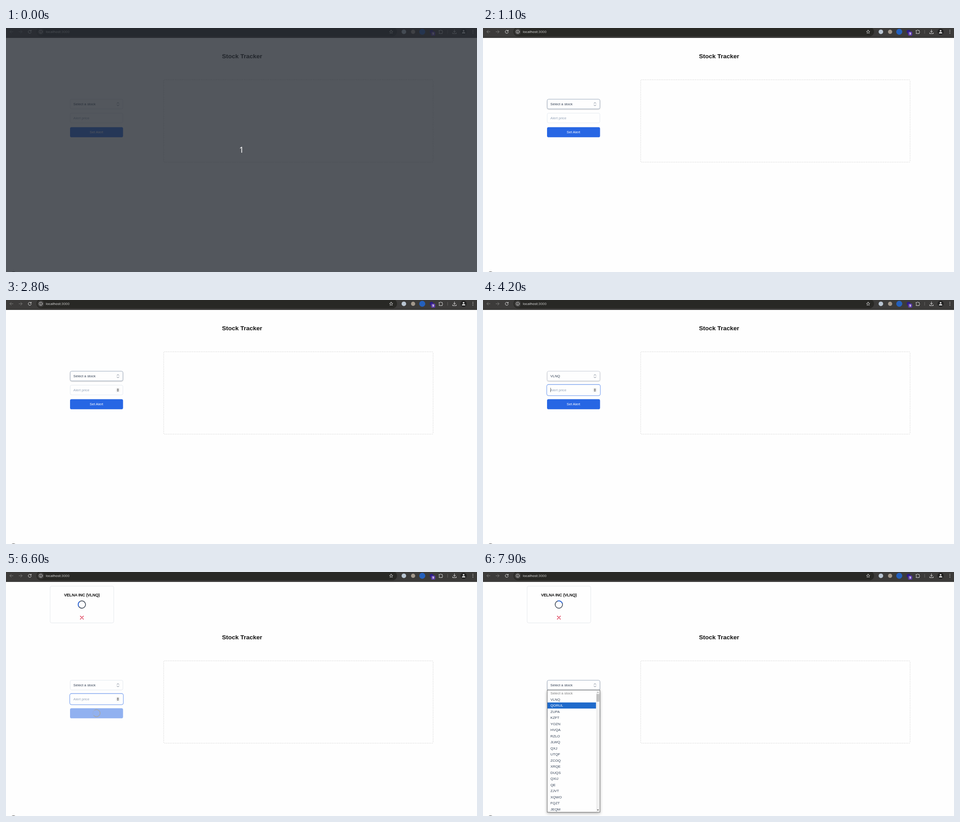
An HTML page that plays this animation: 1037 by 540 pixels, repeating every 8000 ms.

```html
<!DOCTYPE html>
<html lang="en">
<head>
<title>Stock Tracker</title>
<style>
  html, body { margin: 0; width: 100%; height: 100%; overflow: hidden; background: #fefefe; }
  svg { display: block; width: 1037px; height: 540px; }
  text { font: 7.875px "Liberation Sans", Arial, sans-serif; fill: #334155; white-space: pre; }
  .ui { font-family: "Noto Sans", "Open Sans", sans-serif; }
  .mid { text-anchor: middle; }
  .line { fill: none; stroke-linecap: round; stroke-linejoin: round; }
  .soft { filter: drop-shadow(0 .6px .5px #0001); }
  .lift { filter: drop-shadow(0 1px 1.2px #0003); }
  .float { filter: drop-shadow(0 2px 3px #0005); }
</style>
</head>
<body>
<svg viewBox="0 0 1037 540">
  <g id="page"></g>
  <g id="toolbar">
    <rect width="1037" height="22" fill="#3c3b3a"/>
    <rect x="67" y="-2" width="794" height="20.5" rx="10" fill="#282825"/>
    <circle cx="76.5" cy="8.3" r="7.5" fill="#3c3b3a"/>
    <g class="line" stroke="#e0e0e0" stroke-width="1">
      <path stroke="#7b7b79" d="M15.5 8.3H8.5M11.7 5L8.4 8.3L11.7 11.6M28.5 8.3H35.5M32.3 5L35.6 8.3L32.3 11.6"/>
      <path d="M55 6.2A3.4 3.4 0 1 0 55.7 9.2M55.6 4.8V7H53.4"/>
      <circle cx="76.5" cy="8.3" r="3.7" stroke-width=".9"/>
      <path d="M76.5 8.2V10.2M76.5 6.4V6.5"/>
      <path stroke-width=".8" d="M848 4.6L849.1 7.1L851.8 7.4L849.8 9.2L850.4 11.9L848 10.5L845.6 11.9L846.2 9.2L844.2 7.4L846.9 7.1Z"/>
      <path d="M953.7 5.5H955.8A1.4 1.4 0 0 1 958.5 5.5H960.5V7.6A1.4 1.4 0 0 1 960.5 10.3V12.3H953.7V10A1.3 1.3 0 0 0 953.7 7.6Z"/>
      <path d="M987.4 4V9.5M984.9 7.3L987.4 9.7L989.9 7.3M983.4 10.5V12.5H991.4V10.5"/>
    </g>
    <circle cx="876" cy="8.4" r="5" fill="#b9c5d2"/>
    <circle cx="896.3" cy="8.4" r="4.6" fill="#a3988c"/>
    <circle cx="916.5" cy="8.4" r="6.6" fill="#2460bd"/>
    <circle cx="937" cy="8.2" r="4.2" fill="#2b1c86"/>
    <rect x="936" y="8" width="9" height="9" rx="2" fill="#5a3aa6"/>
    <text class="ui mid" x="940.5" y="15" style="font-size:7px;font-weight:700;fill:#fff">9</text>
    <path d="M972.3 4.5V12.5" stroke="#686866"/>
    <circle cx="1007.5" cy="8.3" r="6.8" fill="#222"/>
    <path d="M1003.9 12V11Q1004.2 9 1007.5 9T1011.1 11V12Z" fill="#e8e8e8"/>
    <circle cx="1007.5" cy="6.3" r="1.8" fill="#e8e8e8"/>
    <path class="line" d="M1028 5.1V5.1M1028 8.4V8.4M1028 11.7V11.7" stroke="#e0e0e0" stroke-width="1.6"/>
    <text class="ui" x="87.7" y="11.2" style="font-size:7.7px;fill:#e6e6e6">localhost<tspan fill="#c4c4c2">:3000</tspan></text>
  </g>
  <circle cx="16.5" cy="548.7" r="9.6" fill="#444"/>
  <g id="countdown">
    <rect width="1037" height="540" fill="rgb(37,42,50)" opacity=".79"/>
    <text class="ui mid" x="518.5" y="276.3" style="font-size:17.5px;fill:#fff">1</text>
  </g>
</svg>
<script>
const LOOP = 8000, STEP = 100, ROW = 13.5;
const SUBMIT = 6000, LEAVE = 7300;
const options = ['Select a stock', ...('VLNQ QORUL ZUPA KZFT YOZN HVQA RZLO JLWQ QXJ UTQF ZCOQ XRQE DUQS ' +
  'QXIJ QE ZJVT XQWO FQZT JEQM').split(' ')];

const byId = id => document.getElementById(id);
const within = (t, a, b) => t >= a && t < b;
// Value of the last [time, value] pair already reached
const at = (t, pairs) => pairs.reduce((v, [time, next]) => t >= time ? next : v, undefined);

const text = (x, y, s, style = '', cls = '') => `<text x="${x}" y="${y}" class="${cls}" style="${style}">${s}</text>`;
const rect = (x, y, w, h, fill, more = '') =>
  `<rect x="${x}" y="${y}" width="${w}" height="${h}" fill="${fill}" ${more}/>`;
const path = (d, more) => `<path d="${d}" ${more}/>`;

function loader(x, y, r, t) {
  const turn = (t - 5920) * .36;
  return `<g transform="translate(${x} ${y}) rotate(${turn})" fill="none" stroke-width="1.7">
    <circle r="${r}" stroke="#4b5563"/>
    <path d="M0 ${-r}A${r} ${r} 0 0 1 ${r} 0" transform="rotate(-12)" stroke="#2766e4"/></g>`;
}

function card(t) {
  return rect(97.2, 31.2, 140, 81.5, '#fefefe', 'rx="3.4" stroke="#e3e6ea" stroke-width=".9"') +
    text(167, 54.4, 'VELNA INC (VLNQ)', 'font-size:9px;font-weight:700;letter-spacing:-.2px;fill:#111', 'mid') +
    loader(167, 72, 8.1, t) +
    path('M163.5 97.5l7 7m0-7l-7 7', 'class="line" stroke="#d9213f" stroke-width="1.2"');
}

function select(t) {
  const border = at(t, [[0, '#e2e8f0'], [1000, '#bcc6d3'], [1100, '#94a3b8'], [4200, '#c3c9d5'],
    [4300, '#e2e8f0'], [LEAVE, '#94a3b8']]);
  const lifted = within(t, 1000, 4300) || t >= LEAVE;
  const value = within(t, 2900, SUBMIT) ? options[1] : options[0];
  return rect(141.4, 157.6, 116, 21.4, '#fefefe',
      `rx="3.2" stroke="${border}" stroke-width=".9" class="${lifted ? 'lift' : 'soft'}"`) +
    text(148.3, 170.9, value) +
    path('M244.3 167l2.2-2.2 2.2 2.2M244.3 170.1l2.2 2.2 2.2-2.2', 'class="line" stroke="#45536a" stroke-width=".8"');
}

function input(t) {
  const focus = within(t, 4200, LEAVE);
  const value = t < SUBMIT ? at(t, [[0, ''], [4900, '2'], [5600, '20'], [5800, '200']]) : '';
  const caret = focus && at(t, [[4200, 1], [4700, 0], [4900, 1], [5500, 0], [5600, 1], [6500, 0], [7000, 1]]);
  const arrows = within(t, 700, 800) || within(t, 2800, LEAVE);
  const caretX = 148.8 + value.length * 4.38;
  let out = focus
    ? rect(140.4, 187, 118, 24.6, '#fefefe', 'rx="4" stroke="#86aaf2" stroke-width="1.3" class="soft"')
    : rect(141.4, 188.4, 116, 21.6, '#fefefe', 'rx="3.2" stroke="#e2e8f0" stroke-width=".9"');
  out += value ? text(148.3, 202, value) : text(148.3, 202, 'Alert price', 'fill:#94a3b8');
  if (caret) out += path(`M${caretX} 194.3v9.6`, 'stroke="#222" stroke-width=".7"');
  if (arrows) out += rect(242, 195, 8.6, 8.8, '#f0f0f0') +
    path('M244 198.4l2.3-2.4 2.3 2.4zM244 200.2l2.3 2.4 2.3-2.4z',
      `fill="${within(t, 3100, 3600) ? '#111' : '#444'}"`);
  return out;
}

function button(t) {
  const busy = within(t, SUBMIT, 7000);
  return `<g opacity="${busy ? .5 : 1}">` + rect(141, 219.5, 116.7, 22.3, '#2766e4', 'rx="3.4"') +
    (busy ? loader(199.3, 230.4, 7.9, t) : text(199.2, 233.4, 'Set Alert', 'fill:#fff', 'mid')) + '</g>';
}

function popup(t) {
  const open = within(t, 1500, 2800) || t >= 7500;
  const filled = within(t, 1800, 2800) || t >= 7600;
  const active = at(t, [[0, 0], [1900, 2], [2100, 1], [7500, 0], [7700, 1], [7800, 2]]);
  if (!open) return '';
  let out = rect(141.4, 179.4, 116, 270.2, '#fefefe',
    `class="float" stroke="${filled ? '#666' : '#fefefe'}" stroke-width=".9"`);
  if (!filled) return out;
  options.forEach((name, i) => {
    const y = 179.7 + i * ROW, on = i === active;
    if (on) out += rect(141.9, y, 107, ROW, i ? '#1f6acb' : '#c4c4c4');
    out += text(148.5, y + 9.5, name, on ? 'fill:#fff' : i ? '' : 'fill:#7d7d7d');
  });
  return out + rect(248.9, 179.9, 8.1, 269.2, '#f1f1f1') + rect(249.8, 188, 6.3, 17, '#c0c0c0') +
    path('M250.8 185.2l2.2-2.2 2.2 2.2z', 'fill="#a0a0a0"') +
    path('M250.8 443.8l2.2 2.2 2.2-2.2z', 'fill="#444"');
}

function page(t) {
  const sent = t >= SUBMIT;
  return rect(0, 0, 1037, 540, '#fefefe') + (sent ? card(t) : '') +
    `<g transform="translate(0 ${sent ? 82 : 0})">` +
    text(519.8, 67, 'Stock Tracker', 'font-size:13.5px;font-weight:700;fill:#111', 'mid') +
    rect(347.1, 114.6, 593.2, 182.3, 'none', 'rx="2" stroke="#cfcfcf" stroke-width=".9" stroke-dasharray="2 1.8"') +
    input(t) + button(t) + select(t) + popup(t) + '</g>';
}

let shown = -1;
function frame() {
  const t = Math.floor(performance.now() % LOOP / STEP) * STEP;
  if (t !== shown) {
    shown = t;
    byId('page').innerHTML = page(t);
    byId('countdown').style.display = t < 100 ? '' : 'none';
  }
  requestAnimationFrame(frame);
}
frame();
</script>
</body>
</html>
```
